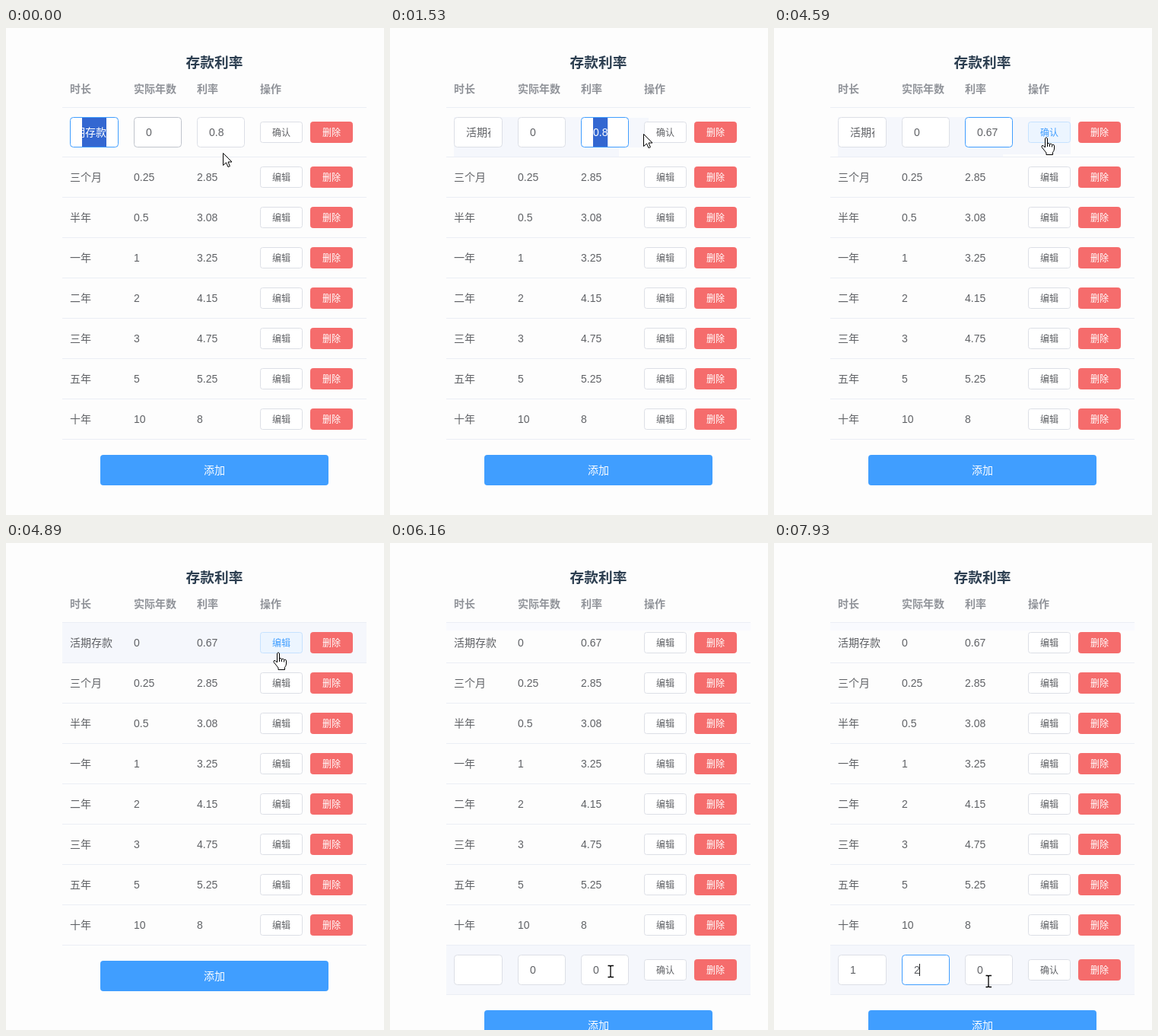
An HTML page that plays this animation: 497x640 px, repeating every 8 s.

```html
<!DOCTYPE html>
<html lang="zh-CN">
<head>
<meta charset="utf-8">
<style>
html, body { margin: 0; width: 100%; height: 100%; overflow: hidden; background: #fdfdfd; }
#stage { display: block; font: 14px "Liberation Sans", "Noto Sans CJK SC", "Noto Sans CJK", sans-serif; }
</style>
</head>
<body>
<svg id="stage" width="497" height="640"></svg>
<script>
const LOOP = 8000, BLINK = 550;
const COLS = [84, 168, 251, 334];
const GREY = '#606266', LINE = '#ebeef5', BORDER = '#dcdfe6', BLUE = '#409eff', TINT = '#f5f7fc';
const SAVED = 4890, ADDED = 6160;
const ROWS = [
  ['三个月', '0.25', '2.85'], ['半年', '0.5', '3.08'], ['一年', '1', '3.25'], ['二年', '2', '4.15'],
  ['三年', '3', '4.75'], ['五年', '5', '5.25'], ['十年', '10', '8'],
];

// time, focused field, field values, selected characters
const EDITS = [
  [0, 0, ['活期存款', '0', '0.8'], 4],
  [450, 1, ['活期存款', '0', '0.8'], 0],
  [1110, 2, ['活期存款', '0', '0.8'], 0],
  [1250, 2, ['活期存款', '0', '0.8'], 2],
  [1390, 2, ['活期存款', '0', '0.8'], 3],
  [2120, 2, ['活期存款', '0', '0'], 0],
  [2240, 2, ['活期存款', '0', '0.'], 0],
  [3890, 2, ['活期存款', '0', '0.6'], 0],
  [4040, 2, ['活期存款', '0', '0.67'], 0],
  [ADDED, -1, ['', '0', '0'], 0],
  [6580, 0, ['', '0', '0'], 0],
  [6850, 0, ['1', '0', '0'], 0],
  [7360, 1, ['1', '0', '0'], 0],
  [7510, 1, ['1', '0', '0'], 1],
  [7930, 1, ['1', '2', '0'], 0],
];

// time, x, y, shape
const MOVES = [
  [0, 285, 164, 'arrow'], [150, 268, 155, 'beam'], [300, 240, 148, 'beam'], [450, 220, 144, 'beam'],
  [600, 216, 143, 'beam'], [870, 217, 143, 'beam'], [990, 240, 141, 'beam'], [1110, 264, 138, 'beam'],
  [1250, 279, 138, 'beam'], [1390, 310, 139, 'beam'], [1530, 333, 139, 'arrow'], [3050, 333, 139, 'none'],
  [4320, 333, 139, 'arrow'], [4470, 345, 142, 'hand'], [4590, 351, 143, 'hand'],
  [5170, 350, 165, 'arrow'], [5320, 345, 250, 'arrow'], [5450, 330, 350, 'arrow'], [5590, 312, 450, 'arrow'],
  [5740, 298, 530, 'arrow'], [5890, 286, 553, 'hand'], [ADDED, 290, 563, 'beam'], [6310, 240, 565, 'beam'],
  [6460, 170, 565, 'beam'], [6580, 136, 565, 'beam'], [6970, 150, 563, 'beam'], [7100, 170, 562, 'beam'],
  [7240, 182, 562, 'beam'], [7510, 225, 567, 'beam'], [7640, 262, 573, 'beam'], [7790, 282, 576, 'beam'],
];

const CURSORS = {
  none: '',
  arrow: '<path d="M.5 .5V16.5L4.5 12.9 7 18.6 9.4 17.6 7 12H12Z" fill="#fff" stroke="#000"/>',
  beam: '<path d="M-3.5 -7.5H-1L0 -6.5 1 -7.5H4M0 -7V7M-3.5 7.5H-1L0 6.5 1 7.5H4" fill="none" stroke="#000" stroke-width="1.3"/>',
  hand: '<path d="M5.5 14V2Q7 -.5 8.5 2V9Q10 7.5 11.5 9.5 13 8.2 14.5 10.3 17.5 9.5 17.5 12V16Q17 19 15.5 20.5V23.5H7V21L1 13.5Q.5 11 3 11.5Z" fill="#fff" stroke="#000" stroke-linejoin="round"/><path d="M8.5 9V13M11.5 10V13M14.5 11V13.5" stroke="#000"/>',
};

const at = (list, t) => list.findLast(item => item[0] <= t);
const rect = (x, y, w, h, fill, extra = '') =>
  `<rect x="${x}" y="${y}" width="${w}" height="${h}" fill="${fill}" ${extra}/>`;
const text = (s, x, y, fill = GREY, extra = '') => `<text x="${x}" y="${y}" fill="${fill}" ${extra}>${s}</text>`;
const outlined = (x, y, w, h, fill, stroke, r) =>
  rect(x + .5, y + .5, w - 1, h - 1, fill, `stroke="${stroke}" rx="${r}"`);
const clip = (x, y, w, h, body) => `<svg x="${x}" y="${y}" width="${w}" height="${h}">${body}</svg>`;
const rule = y => rect(74, y, 400, 1, LINE);
const textWidth = s => [...s].reduce((w, c) => w + (c === '.' ? 3.89 : c > '~' ? 14 : 7.786), 0);

function button(label, x, mid, [fill, stroke, color]) {
  return outlined(x, mid - 14, 56, 28, fill, stroke, 3) +
    text(label, x + 28, mid + 4.5, color, 'font-size="12" text-anchor="middle"');
}

const PLAIN = ['#fff', BORDER, GREY], HOVER = ['#ecf5ff', '#c6e2ff', BLUE];
const FADED = ['#f2f9fe', '#c9dcf0', '#4a80b5'], DANGER = ['#f56c6c', '#f56c6c', '#fff'];

const actions = (label, mid, style) => button(label, 334, mid, style) + button('删除', 400, mid, DANGER);

const dataRow = (values, mid, style = PLAIN) =>
  values.map((v, i) => text(v, COLS[i], mid + 5)).join('') + actions('编辑', mid, style) + rule(mid + 26);

function input(i, mid, t) {
  const [time, focus, values, selected] = at(EDITS, t);
  const x = COLS[i], value = values[i], focused = focus === i, top = mid - 20;
  const focusStart = EDITS.find(e => e[1] === focus && (e[0] >= ADDED) === (t >= ADDED))[0];
  const settled = focusStart === 0 || t - focusStart >= 120;
  const stroke = focused ? (settled ? BLUE : '#a6c3de') : i === 1 && t < 150 ? '#c0c4cc' : BORDER;
  const scroll = focused ? Math.min(0, 32 - textWidth(value)) : 0;
  let out = outlined(x, top, i ? 63 : 64, 40, '#fff', stroke, 4) +
    clip(x + 16, top, 32, 40, text(value, scroll, 25));
  if (selected && focused) {
    const w = Math.min(32, textWidth(value.slice(0, selected)));
    out += clip(x + 16, top + 1, w, 38, rect(0, 0, w, 38, '#3367d1') + text(value, scroll, 24, '#fff'));
  } else if (focused && Math.floor((t - time + 20) / BLINK) % 2 === 0) {
    out += rect(x + 16 + Math.floor(textWidth(value)), mid - 8, 1, 16, '#222');
  }
  return out;
}

const editRow = (mid, t, style) =>
  [0, 1, 2].map(i => input(i, mid, t)).join('') + actions('确认', mid, style) + rule(mid + 32);

function hoverTint(t, y) {
  if (t < SAVED) {
    return (t >= 150 ? rect(84, 117, 217, 52, TINT) : '') +
      (t >= 1530 ? rect(301, 118, 39, 39, TINT) : '') +
      (t >= 4470 ? rect(301, 117, 89, 49, TINT) : '');
  }
  const edge = rect(74, 105, 400, 10, '#f9fafe');
  const row = Math.floor((y - 105) / 53);
  if (row < 8) return edge + rect(74, 105 + row * 53, 400, 52, TINT);
  return edge + (t >= ADDED ? rect(74, 529, 400, 64, TINT) : '');
}

function scene(t) {
  const [, x, y, shape] = at(MOVES, t);
  const saved = t >= SAVED, added = t >= ADDED;
  const firstMid = saved ? 131 : 143;
  const addTop = added ? 614 : saved ? 549 : 561;
  const firstStyle = t < 4470 || t >= 6040 ? PLAIN : t < 5320 ? HOVER : FADED;
  const addFill = t >= 5890 && !added ? '#4f9ff2' : BLUE;
  return text('存款利率', 274, 52, '#2c3e50', 'font-size="18.72" font-weight="bold" text-anchor="middle"') +
    ['时长', '实际年数', '利率', '操作'].map((s, i) => text(s, COLS[i], 85, '#909399', 'font-weight="bold"')).join('') +
    hoverTint(t, y) + rule(104) +
    (saved ? dataRow(['活期存款', '0', '0.67'], 131, firstStyle) : editRow(137, t, firstStyle)) +
    ROWS.map((row, i) => dataRow(row, firstMid + 53 * (i + 1))).join('') +
    (added ? editRow(561, t, PLAIN) : '') +
    rect(124, addTop, 300, 40, addFill, 'rx="4"') +
    text('添加', 274, addTop + 25, '#fff', 'text-anchor="middle"') +
    `<g transform="translate(${x} ${y})">${CURSORS[shape]}</g>`;
}

const stage = document.getElementById('stage');
let shown = '';
function tick() {
  const next = scene(performance.now() % LOOP);
  if (next !== shown) stage.innerHTML = shown = next;
  requestAnimationFrame(tick);
}
tick();
</script>
</body>
</html>
```
